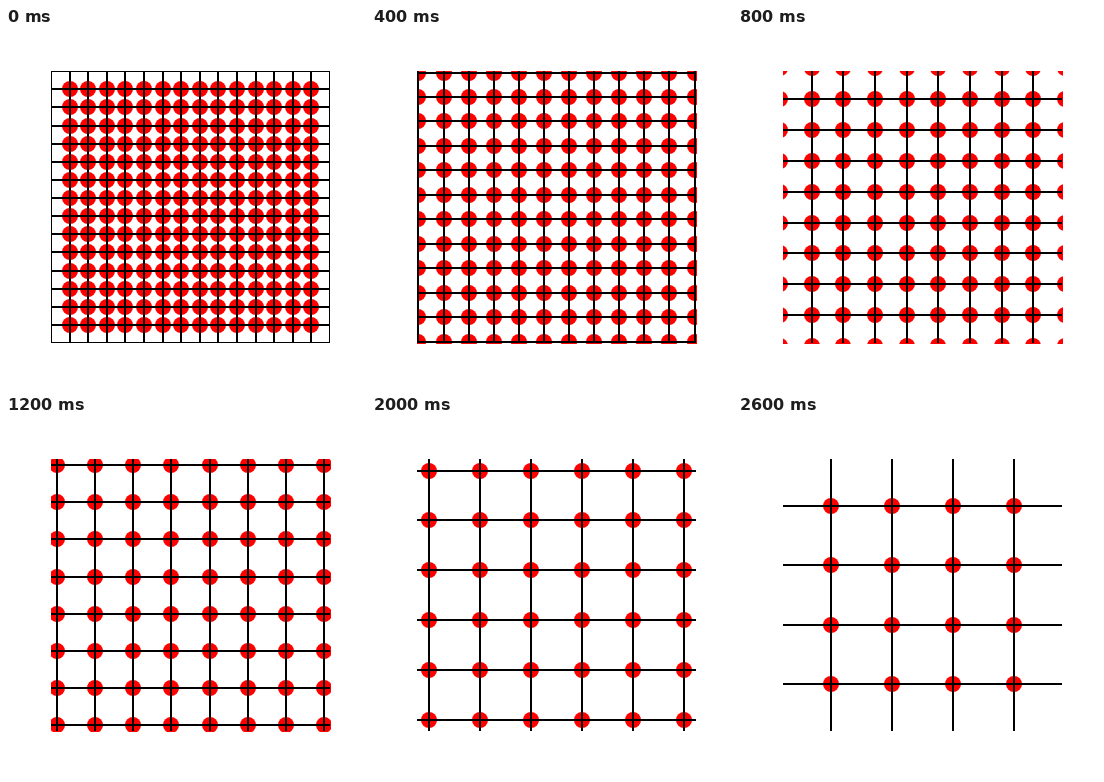
An HTML page with a canvas that plays this animation: 360 px wide and 360 px high, repeating every 2.7 s.

```html
<!DOCTYPE html>
<html>
<head>
<meta charset="utf-8">
<title>Expanding grid</title>
<style>
  html, body { margin: 0; width: 100%; height: 100%; overflow: hidden; background: #fff; }
  canvas { display: block; }
</style>
</head>
<body>
<canvas id="stage" width="360" height="360"></canvas>
<script>
const ctx = document.getElementById('stage').getContext('2d');
const LEFT = 45, TOP = 43, RIGHT = 324, BOTTOM = 315;
const CENTER_X = 184.5, CENTER_Y = 179.1;
const UNIT_X = 18.6, UNIT_Y = 18.12;   // 15 units span the plot at the start
const STEP = 100, STEPS = 27, GROWTH = 0.0875;
const RADIUS = 8;

function clipped(width, height, draw) {
  ctx.save();
  ctx.beginPath();
  ctx.rect(LEFT, TOP, width, height);
  ctx.clip();
  draw();
  ctx.restore();
}

function render(step) {
  const scale = 1 + GROWTH * step;
  const px = i => Math.round(CENTER_X + (i - 7.5) * UNIT_X * scale);
  const py = i => Math.round(CENTER_Y + (i - 7.5) * UNIT_Y * scale);

  ctx.fillStyle = '#fff';
  ctx.fillRect(0, 0, 360, 360);

  clipped(RIGHT - LEFT + 1, BOTTOM - TOP + 1, () => {
    ctx.fillStyle = '#f00';
    for (let i = 1; i <= 14; i++) {
      for (let j = 1; j <= 14; j++) {
        ctx.beginPath();
        ctx.arc(px(i), py(j), RADIUS, 0, 2 * Math.PI);
        ctx.fill();
      }
    }
  });

  clipped(RIGHT - LEFT, BOTTOM - TOP, () => {
    ctx.fillStyle = '#000';
    for (let i = 0; i <= 15; i++) {
      ctx.fillRect(px(i) - 1, 0, 2, 360);
      ctx.fillRect(0, py(i) - 1, 360, 2);
    }
  });
}

function tick() {
  render(Math.floor(performance.now() / STEP) % STEPS);
  requestAnimationFrame(tick);
}
tick();
</script>
</body>
</html>
```
